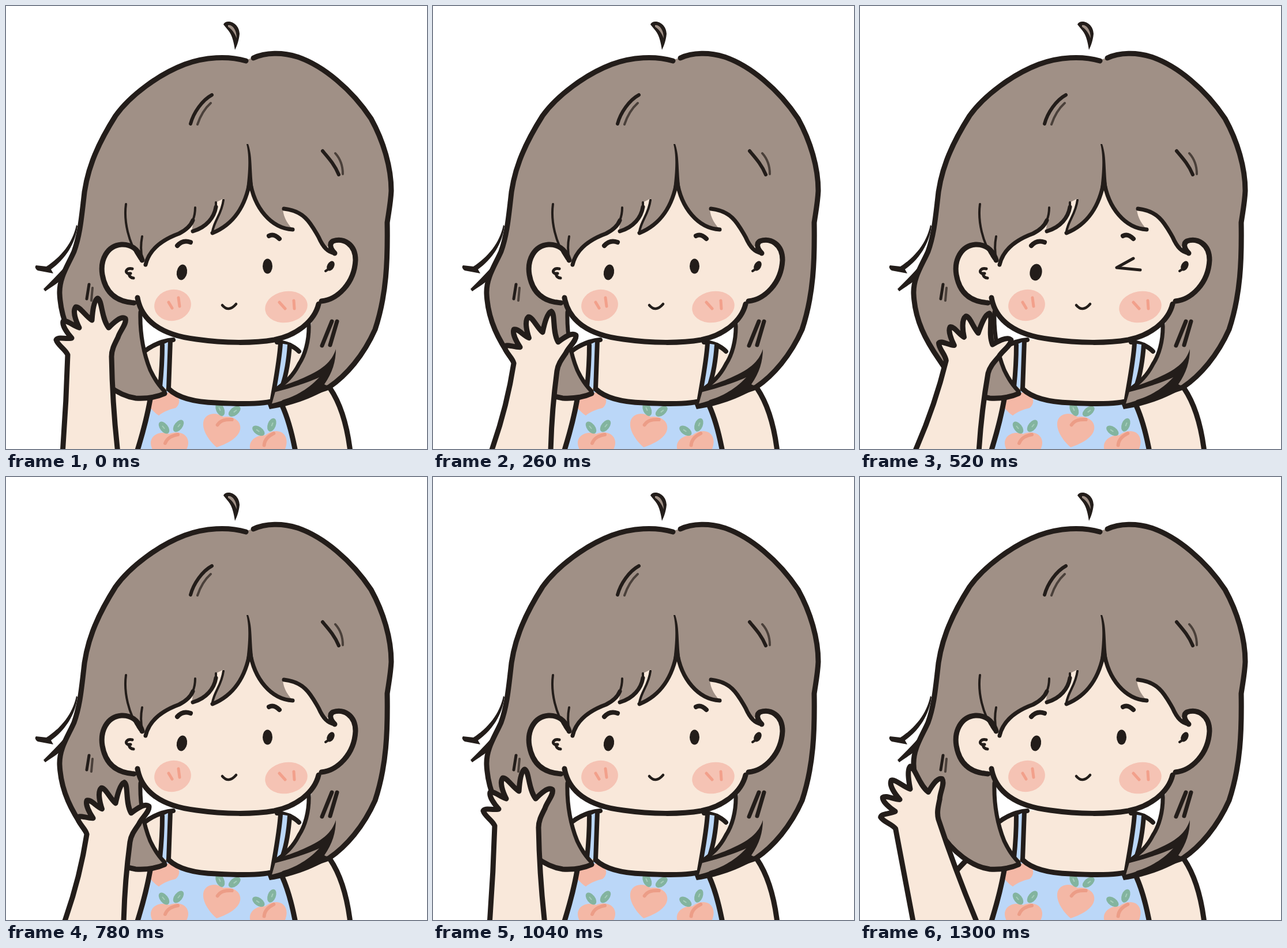
Write an HTML page that moves like this. It is 730 px wide and 767 px high and loops after 1560 ms.

```html
<!DOCTYPE html>
<html lang="en">
<head>
<meta charset="utf-8">
<title>Waving girl</title>
<style>
  html, body { margin: 0; width: 100%; height: 100%; overflow: hidden; background: #fff; }
  svg { display: block; width: 100%; height: 100%; }
  .ink { fill: none; stroke: #231d1a; stroke-width: 9; stroke-linecap: round; stroke-linejoin: round; }
  .solid { fill: #231d1a; }
  .skin { fill: #f9e8da; }
  .hair { fill: #a09086; }
  .blue { fill: #bbd7f8; }
  .cheek { fill: #f5c3b4; }
  .soft { stroke: #4a403a; }
</style>
</head>
<body>
<svg viewBox="0 0 730 767" preserveAspectRatio="none">
  <defs>
    <g id="peach">
      <path fill="#f4b8a6" d="M0 32C-16 24-34 8-33-8C-31-23-14-27-1-22C12-28 31-24 32-8C33 8 14 23 0 32Z"/>
      <path d="M-8-6C-4-16 4-19 14-21" fill="none" stroke="#ec9d87" stroke-width="6" stroke-linecap="round"/>
      <g fill="#83b49f">
        <ellipse cx="-10" cy="-33" rx="7" ry="12" transform="rotate(-38 -10 -33)"/>
        <ellipse cx="15" cy="-36" rx="7" ry="12" transform="rotate(38 15 -36)"/>
      </g>
      <path d="M-13-36L-9-31M18-39L14-34" stroke="#a5cdbb" stroke-width="2"/>
    </g>
    <clipPath id="dress">
      <path d="M283 664C300 680 330 687 365 688C400 690 450 690 466 683L480 692L502 770H226C236 740 245 710 250 680Z"/>
    </clipPath>
  </defs>

  <!-- body -->
  <path class="skin" d="M240 598C258 584 275 578 290 577L472 580C490 583 500 588 508 598L560 662C580 690 592 730 597 770H172L168 680L188 660Z"/>
  <path class="ink" d="M190 658C181 667 174 674 168 681M562 662C581 690 592 730 597 772"/>
  <path class="ink" style="stroke-width:8" d="M240 598C255 586 270 580 290 578M470 582C486 583 498 588 508 598"/>

  <!-- dress -->
  <g clip-path="url(#dress)">
    <path class="blue" d="M220 650H510V770H220Z"/>
    <path fill="#f4b8a6" d="M244 676L288 668C302 676 304 688 294 696C284 698 272 703 265 709C256 704 250 694 244 690Z"/>
    <use href="#peach" transform="translate(373 733) rotate(14)"/>
    <use href="#peach" transform="translate(284 763)"/>
    <use href="#peach" transform="translate(457 764) rotate(-17)"/>
  </g>
  <path class="blue" d="M272 586L285 580L282 662L266 660ZM475 584L493 587L482 655L463 682Z"/>
  <path class="ink" style="stroke-width:8" d="M271 587C271 615 269 640 267 660M285 579C284 610 283 635 282 662M476 584C474 615 467 650 462 680M492 587C490 615 485 640 480 655"/>
  <path class="ink" d="M282 663C300 680 330 686 365 687C400 689 450 690 468 682M250 681C245 710 237 740 227 772M479 692C488 712 496 740 502 772"/>

  <!-- hair -->
  <path class="hair" d="M417 93C385 85 345 88 310 101C265 118 215 155 190 190C155 245 138 290 134 340C130 375 127 400 118 425C108 448 92 470 93 498C95 545 115 580 137 612C160 650 195 675 225 679C245 680 262 677 277 671C250 640 234 600 232 545L235 500H543C528 540 526 585 508 618C498 640 485 655 468 664L460 692C490 685 530 670 560 660C590 640 620 605 640 560C660 500 662 440 661 375C664 355 667 340 668 320C668 280 655 235 633 195C600 145 550 103 505 88C480 80 450 80 428 90Z"/>
  <path class="ink" d="M416 95C385 86 345 88 310 101C265 118 215 155 190 190C155 245 138 290 134 340C130 375 127 400 118 425C108 448 92 470 93 498C95 545 115 580 137 612C160 650 195 675 225 679C245 680 262 677 275 671"/>
  <path class="ink" d="M429 90C450 80 480 80 505 88C550 103 600 145 633 195C655 235 668 280 668 320C667 340 664 355 661 375C662 440 660 500 640 560C620 605 590 640 560 660C530 670 500 681 482 686"/>
  <path class="ink" style="stroke-width:7" d="M233 530C232 570 240 605 250 630C257 645 266 658 275 667M525 550C526 580 518 605 508 620C498 640 485 652 468 664"/>
  <path class="solid" d="M572 594C563 622 540 638 466 662L464 669C500 660 528 650 543 643C520 668 490 682 454 690L457 698C500 692 540 675 562 660L552 655C566 635 572 615 572 594Z"/>
  <path class="solid" d="M122 379C116 410 95 435 70 451L52 449Q48 453 55 458L82 463L78 456C103 438 120 412 124 381ZM122 422C108 448 90 465 65 490L68 494C85 482 97 476 104 464Z"/>
  <path class="solid" d="M377 32C381 22 404 27 405 48C404 60 400 70 397 76C395 64 393 52 386 43Z"/>
  <path class="hair" d="M385 33C392 32 400 40 400 56C397 48 392 40 385 36Z"/>
  <path class="ink" style="stroke-width:6" d="M357 154C340 163 325 185 320 204M549 251C560 264 570 275 577 292"/>
  <path class="ink soft" style="stroke-width:4" d="M355 168C345 177 337 190 332 205M571 255C580 265 584 278 584 291M150 488L148 510"/>
  <path class="ink" style="stroke-width:5" d="M144 482L140 507"/>
  <path class="ink" style="stroke-width:7" d="M565 546L548 588M574 546L562 587"/>

  <!-- face and ears -->
  <path class="skin" d="M240 440C230 420 215 412 200 413C175 415 163 440 167 465C172 495 190 512 226 515L260 490ZM560 412C575 400 605 405 606 440C606 480 575 508 543 513L530 460Z"/>
  <path class="skin" d="M243 450C248 422 270 405 300 394C315 387 324 375 328 350L322 391C350 382 364 362 364 340L378 333C376 360 356 370 357 394C395 378 418 345 423 305C430 350 460 385 498 387C485 375 480 360 480 350C520 355 530 380 542 400C550 418 560 425 572 428L560 480L543 515C535 545 505 570 465 578C430 584 380 584 330 577C270 570 235 545 228 505L232 450Z"/>
  <path class="ink" d="M236 440C230 420 215 412 200 413C175 415 163 440 167 465C172 495 190 512 222 514M570 428C562 420 560 411 567 407C585 401 606 412 606 440C604 480 575 508 547 511"/>
  <path class="ink" d="M228 505C235 545 270 570 330 577C380 584 430 584 465 578C505 570 535 545 542 516"/>
  <path class="ink" style="stroke-width:7" d="M242 448C248 422 270 405 300 394C312 388 320 381 324 371M324 390C348 383 361 366 364 348M358 393C395 378 416 345 423 302C430 350 460 385 497 387M482 351C520 355 530 380 542 400C550 418 558 426 570 428"/>
  <path class="ink" style="stroke-width:4" d="M324 371Q328 361 328 349M364 348V340M377 336C374 360 362 370 358 390M208 343C204 372 212 410 232 438M236 399C233 415 234 430 237 442"/>
  <path class="solid" d="M417 239C422 260 421 285 416 325L424 308L430 325C424 285 428 262 420 239Z"/>
  <path class="ink" style="stroke-width:5" d="M219 455C210 453 205 460 211 463L216 463M213 464Q215 471 221 471"/>
  <ellipse class="solid" cx="563" cy="450" rx="6" ry="9" transform="rotate(28 563 450)"/>
  <path class="ink" style="stroke-width:4" d="M563 453L554 459"/>
  <path class="ink" style="stroke-width:8" d="M297 415C304 407 312 406 320 409M456 398C463 394 469 398 474 403"/>
  <g class="cheek">
    <ellipse cx="289" cy="518" rx="32" ry="27" transform="rotate(-10 289 518)"/>
    <ellipse cx="486" cy="521" rx="37" ry="27" transform="rotate(-10 486 521)"/>
  </g>
  <path d="M282 513L288 523M299 505L301 520M474 513L484 524M499 510L500 524" stroke="#f2a08b" stroke-width="5" stroke-linecap="round"/>
  <path class="ink" style="stroke-width:4.5" d="M375 518Q386 531 399 516"/>
  <ellipse id="leftEye" class="solid" cx="305" cy="461" transform="rotate(10 305 461)"/>
  <ellipse id="rightEye" class="solid" cx="453.500" cy="450.500" rx="8.500" ry="13"/>
  <path id="wink" class="ink" style="stroke-width:5" d="M474 437L445 453L486 457"/>

  <path id="arm" class="ink" style="fill:#f9e8da"/>
</svg>
<script>
  const STEP = 260;
  const el = id => document.getElementById(id);

  // Wrist to wrist: a start point, then cubic segments.
  const hand = [
    [107, 604], [103, 594], [90, 588], [87, 578], [90, 572], [102, 577], [114, 575],
    [106, 566], [97, 553], [99, 546], [106, 543], [116, 554], [127, 557],
    [121, 545], [115, 528], [121, 521], [128, 520], [138, 537], [149, 544],
    [150, 530], [152, 510], [159, 506], [167, 510], [165, 540], [178, 557],
    [186, 549], [199, 536], [207, 541], [210, 550], [197, 563], [194, 574],
    [188, 586], [183, 595], [183, 607]
  ];
  const pivot = [135, 538];

  // Hand turn and shift, where the forearm leaves the stage, and its bow.
  const poses = {
    out:  { turn: -14.7, dx: -63, dy: 0,  left: 93, right: 204, bow: 0 },
    up:   { turn: 0,     dx: 0,   dy: 0,  left: 98, right: 194, bow: 2 },
    near: { turn: 8,     dx: 42,  dy: 19, left: 100, right: 204, bow: 8 },
    in:   { turn: 14.6,  dx: 58,  dy: 19, left: 94, right: 206, bow: 8 }
  };
  const cycle = ['up', 'near', 'in', 'near', 'up', 'out'];

  function armPath({ turn, dx, dy, left, right, bow }) {
    const a = turn * Math.PI / 180, c = Math.cos(a), s = Math.sin(a), floor = 774;
    const pts = hand.map(([x, y]) => {
      const u = x - pivot[0], v = y - pivot[1];
      return [pivot[0] + dx + u * c - v * s, pivot[1] + dy + u * s + v * c];
    });
    const start = pts[0], end = pts[pts.length - 1];
    const mid = (p, x, shift) => [(p[0] + x) / 2 + shift, (p[1] + floor) / 2];
    return `M${left} ${floor}Q${mid(start, left, bow)} ${start}C${pts.slice(1).join(' ')}` +
      `Q${mid(end, right, -4)} ${right} ${floor}`;
  }

  function draw(time) {
    const name = cycle[Math.floor(time / STEP) % cycle.length];
    const winking = name === 'in';
    el('arm').setAttribute('d', armPath(poses[name]));
    el('leftEye').setAttribute('rx', winking ? 10.5 : 9);
    el('leftEye').setAttribute('ry', winking ? 14.5 : 13.5);
    el('rightEye').style.display = winking ? 'none' : '';
    el('wink').style.display = winking ? '' : 'none';
  }

  const begin = performance.now();
  function tick() {
    draw(performance.now() - begin);
    requestAnimationFrame(tick);
  }
  tick();
</script>
</body>
</html>
```
